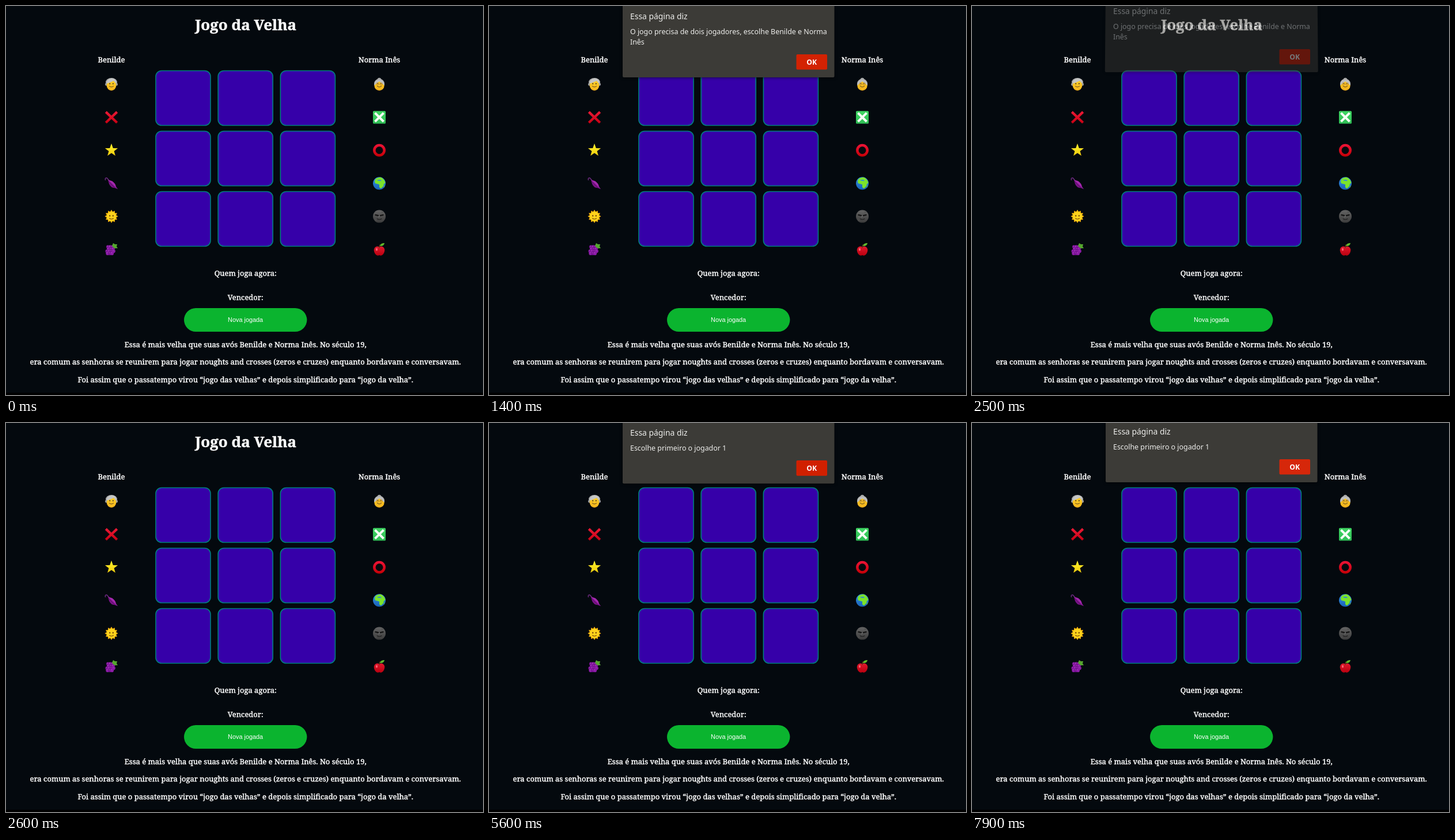
Write an HTML page with a canvas that moves like this. It is 828 px wide and 676 px high and loops after 8 s.

```html
<!DOCTYPE html>
<html lang="pt">
<head>
<meta charset="utf-8">
<title>Jogo da Velha</title>
<style>
  html, body { margin: 0; width: 100%; height: 100%; overflow: hidden; background: #04090e; }
  canvas { display: block; }
</style>
</head>
<body>
<canvas id="stage" width="828" height="676"></canvas>
<script>
const W = 828, H = 676, LOOP = 8000, TAU = Math.PI * 2;
const SERIF = '"Noto Serif", serif', SANS = '"Noto Sans", sans-serif';
const stage = document.getElementById('stage').getContext('2d');

function makeLayer() {
  const canvas = document.createElement('canvas');
  canvas.width = W;
  canvas.height = H;
  return canvas.getContext('2d');
}

function text(c, str, x, y, font, color = '#fff', align = 'center') {
  c.font = font;
  c.fillStyle = color;
  c.textAlign = align;
  c.fillText(str, x, y);
}

// A hairline outline gives the serif text its medium weight.
function slabText(c, str, x, y, font) {
  text(c, str, x, y, font);
  c.strokeStyle = '#fff';
  c.lineWidth = .45;
  c.lineJoin = 'round';
  c.strokeText(str, x, y);
}

function box(c, x, y, w, h, r, fill) {
  c.beginPath();
  c.roundRect(x, y, w, h, r);
  c.fillStyle = fill;
  c.fill();
}

function oval(c, x, y, rx, ry, fill) {
  c.beginPath();
  c.ellipse(x, y, rx, ry, 0, 0, TAU);
  c.fillStyle = fill;
  c.fill();
}
const disc = (c, x, y, r, fill) => oval(c, x, y, r, r, fill);

function path(c, d, fill) {
  c.fillStyle = fill;
  c.fill(new Path2D(d));
}

function line(c, d, color, width, cap = 'round') {
  c.strokeStyle = color;
  c.lineWidth = width;
  c.lineCap = cap;
  c.stroke(new Path2D(d));
}

function spikes(c, count, outer, inner, fill) {
  c.beginPath();
  for (let i = 0; i < count * 2; i++) {
    const a = i * Math.PI / count - Math.PI / 2, r = i % 2 ? inner : outer;
    c.lineTo(r * Math.cos(a), r * Math.sin(a));
  }
  c.closePath();
  c.fillStyle = fill;
  c.fill();
}

function shade(c, from, to) {
  const g = c.createLinearGradient(0, -11, 0, 11);
  g.addColorStop(0, from);
  g.addColorStop(1, to);
  return g;
}

function smile(c, color, eye = 1.1) {
  oval(c, -2.8, -1, eye, eye * 1.3, color);
  oval(c, 2.8, -1, eye, eye * 1.3, color);
  line(c, 'M-3.4 3.4Q0 6 3.4 3.4', color, 1.1);
}

// Each icon is drawn around its own centre, about 22 px wide.
const icons = {
  elder(c) {
    oval(c, 0, -3.5, 10, 7.6, '#a9aaa9');
    disc(c, -8.4, 0, 2.6, '#9b9c9b');
    disc(c, 8.4, 0, 2.6, '#9b9c9b');
    oval(c, 0, 2, 8.3, 9, shade(c, '#ffd52c', '#f5b51d'));
    path(c, 'M-8.6-1Q-8-10 1-10.5Q9-10 8.6-1Q6-3 4-6Q-2-3-8.6-1Z', '#c5c6c5');
    smile(c, '#5b4320', 1);
  },
  granny(c) {
    disc(c, 0, -8, 3.2, '#a4a5a5');
    oval(c, 0, -1, 9, 8.5, '#b0b1b1');
    oval(c, 0, 2.5, 8.6, 8.5, shade(c, '#ffd52c', '#f2b01b'));
    path(c, 'M-9 2Q-8.5-7.5 0-7.5Q8.5-7.5 9 2Q5-1 0-5Q-5-1-9 2Z', '#bfc0c0');
    smile(c, '#554022', .8);
    c.strokeStyle = '#b07a2a';
    c.lineWidth = .6;
    for (const x of [-3, 3]) {
      c.beginPath();
      c.arc(x, -.5, 2.4, 0, TAU);
      c.stroke();
    }
  },
  cross(c) {
    line(c, 'M-9.7-9.3L9.7 9.3M9.7-9.3L-9.7 9.3', shade(c, '#ee1b38', '#c70012'), 4.3, 'butt');
  },
  greenCross(c) {
    box(c, -11, -11, 22, 22, 1.5, shade(c, '#3fd763', '#2fbd55'));
    line(c, 'M-7.5-7.5L7.5 7.5M7.5-7.5L-7.5 7.5', '#f6fff6', 4, 'butt');
  },
  star(c) {
    spikes(c, 5, 11.7, 4.8, shade(c, '#fff12c', '#f0ca0b'));
  },
  ring(c) {
    c.beginPath();
    c.arc(0, 0, 8.7, 0, TAU);
    c.strokeStyle = shade(c, '#ee1438', '#c50006');
    c.lineWidth = 4.5;
    c.stroke();
  },
  umbrella(c) {
    line(c, 'M-10.5-6Q-11.5-10-8-9.5L-4-5', '#6c2a80', 1.5);
    path(c, 'M-6-6L1-4Q7 0 8 6L11 10L6 8Q-1 8-4 1Z', '#7a1288');
    path(c, 'M-6-6L1-4Q7 0 8 6L11 10Z', '#a329ae');
    line(c, 'M-5-4L5 7', '#56105f', .9);
  },
  globe(c) {
    disc(c, 0, 0, 11, shade(c, '#3490e1', '#1963b8'));
    path(c, 'M-7-7Q-3-11 3-10.5Q9-7 10.5-1L8 1L7 5L3 9L0 7L0 2L-3 1L-7 0L-8-3Z', '#7be32c');
    path(c, 'M-4-6L2-6.5L4-4L-2-4.5Z', '#328bd7');
    path(c, 'M8 5L9.5 3L8 8Z', '#7be32c');
  },
  sun(c) {
    spikes(c, 12, 11.5, 8.4, '#ffb80e');
    disc(c, 0, 0, 8.2, '#ffd21c');
    smile(c, '#6b3b08');
  },
  moon(c) {
    disc(c, 0, 0, 11, shade(c, '#646464', '#3c3c3c'));
    disc(c, -6, 6, 2.2, '#4b4b4b');
    disc(c, 5, -7, 2, '#565656');
    line(c, 'M-6.5-2.5L-2-1.5M2-1.5L6.5-2.5', '#151515', 2.4);
    line(c, 'M-4 4.2Q0 6.5 4 4.2', '#1c1c1c', 1.1);
    line(c, 'M0-1L-1 1.5', '#777', 1);
  },
  grapes(c) {
    for (let row = 0; row < 4; row++) {
      for (let i = 0; i < 4 - row % 2; i++) {
        const x = -6 + i * 3.8 + row % 2 * 1.8 - row * .8, y = -4.5 + row * 3.8;
        if (x + y > 9) continue;
        disc(c, x, y, 3.1, (row + i) % 2 ? '#8a1ba5' : '#74118f');
        disc(c, x - .8, y - 1, .9, '#a83bbb');
      }
    }
    path(c, 'M1-6L3-11L6-9L10-9L9-5L11-2L5-2Z', '#54a52e');
  },
  apple(c) {
    path(c, 'M0-4Q4-7 8-3Q11 2 7 8Q4 12 0 10Q-4 12-7 8Q-11 2-8-3Q-4-7 0-4Z', shade(c, '#f02138', '#b9000f'));
    oval(c, -4.5, 0, 1.5, 2.5, '#ff6675');
    line(c, 'M0-3Q0-6 1-8', '#6a3b18', 1.4);
    path(c, 'M1-6Q2-11 9-11Q8-5 1-6Z', '#62b82c');
  }
};

function drawPage(c) {
  c.fillStyle = '#04090e';
  c.fillRect(0, 0, W, H);
  c.fillStyle = '#000';
  c.fillRect(0, 672, W, 4);

  const body = `500 12.97px ${SERIF}`;
  slabText(c, 'Jogo da Velha', 416, 42, `bold 26px ${SERIF}`);
  slabText(c, 'Benilde', 183, 98, body);
  slabText(c, 'Norma Inês', 648, 98, body);
  slabText(c, 'Quem joga agora:', 415.7, 468.5, body);
  slabText(c, 'Vencedor:', 415.7, 511, body);
  [
    'Essa é mais velha que suas avós Benilde e Norma Inês. No século 19,',
    'era comum as senhoras se reunirem para jogar noughts and crosses (zeros e cruzes) enquanto bordavam e conversavam.',
    'Foi assim que o passatempo virou “jogo das velhas” e depois simplificado para “jogo da velha”.'
  ].forEach((str, i) => slabText(c, str, 415.7, 593 + i * 30.3, body));

  for (let i = 0; i < 9; i++) {
    const x = 260 + (i % 3) * 108.2, y = 112.5 + Math.floor(i / 3) * 105;
    box(c, x, y, 95, 95, 10, '#3600a9');
    c.strokeStyle = '#008080';
    c.lineWidth = 1.6;
    c.stroke();
  }

  const columns = [
    [183, ['elder', 'cross', 'star', 'umbrella', 'sun', 'grapes']],
    [648, ['granny', 'greenCross', 'ring', 'globe', 'moon', 'apple']]
  ];
  for (const [x, names] of columns) {
    names.forEach((name, i) => {
      c.save();
      c.translate(x, 136 + i * 57.4);
      icons[name](c);
      c.restore();
    });
  }

  box(c, 309, 525, 213.4, 41, 20.5, '#0bb42f');
  text(c, 'Nova jogada', 415.6, 549, '10.9px "Liberation Sans", Arial, sans-serif');
}

// poses: [start ms, opacity, vertical shift, widening of the lower edge]
const dialogs = [
  {
    lines: ['O jogo precisa de dois jogadores, escolhe Benilde e Norma', 'Inês'],
    hover: 1400, press: 2200,
    poses: [[800, .55, -8.7, 1.2], [900, 1, 0, 0], [2400, 1, -3, 0], [2500, .45, -9, 1.2], [2600, 0, 0, 0]]
  },
  {
    lines: ['Escolhe primeiro o jogador 1'],
    hover: 6400, press: 7700,
    poses: [[5400, .06, -15.3, 1.5], [5500, .65, -6, 1], [5600, 1, -.8, 0], [5800, 1, 0, 0], [7900, 1, -3, 0]]
  }
];

function okColor(t, { hover, press }) {
  if (t >= press && t < press + 100) return '#c21d00';
  const k = Math.max(0, Math.min(1, (Math.floor((t - hover) / 100) + 1) / 3));
  return `rgb(${209 + 5 * k}, ${32 + 7 * k}, ${10 * k})`;
}

function drawDialog(c, dialog, t, flare) {
  const extra = (dialog.lines.length - 1) * 18;
  const bottom = 106 + extra, okY = 79.2 + extra;
  c.save();
  c.shadowColor = 'rgba(0,0,0,.55)';
  c.shadowBlur = 5;
  c.shadowOffsetY = 1;
  path(c, `M232-20H599.5L${599.5 + flare} ${bottom - 2}q0 2-2 2H${234 - flare}q-2 0-2-2Z`, '#3c3b37');
  c.restore();

  text(c, 'Essa página diz', 245, 23, `13.9px ${SANS}`, '#eeeeec', 'left');
  dialog.lines.forEach((str, i) => text(c, str, 245, 48.5 + i * 18, `12.4px ${SANS}`, '#eeeeec', 'left'));
  box(c, 533.5, okY - 13.3, 53.5, 26.6, 2, okColor(t, dialog));
  text(c, 'OK', 560.2, okY + 4.4, `bold 12.2px ${SANS}`);
}

const page = makeLayer(), overlay = makeLayer();
drawPage(page);

function render(t) {
  stage.drawImage(page.canvas, 0, 0);

  if (t >= 500 && t < 600) {
    stage.beginPath();
    stage.roundRect(308.3, 524.3, 214.4, 42.4, 21.2);
    stage.strokeStyle = 'rgba(11,180,47,.55)';
    stage.lineWidth = 1.6;
    stage.stroke();
  }

  for (const dialog of dialogs) {
    const pose = dialog.poses.findLast(p => t >= p[0]);
    if (!pose || !pose[1]) continue;
    const [, opacity, shift, flare] = pose;
    overlay.clearRect(0, 0, W, H);
    overlay.save();
    overlay.translate(0, shift);
    drawDialog(overlay, dialog, t, flare);
    overlay.restore();
    stage.globalAlpha = opacity;
    stage.drawImage(overlay.canvas, 0, 0);
    stage.globalAlpha = 1;
  }
}

const start = performance.now();
function tick() {
  render((performance.now() - start) % LOOP);
  requestAnimationFrame(tick);
}
tick();
</script>
</body>
</html>
```
